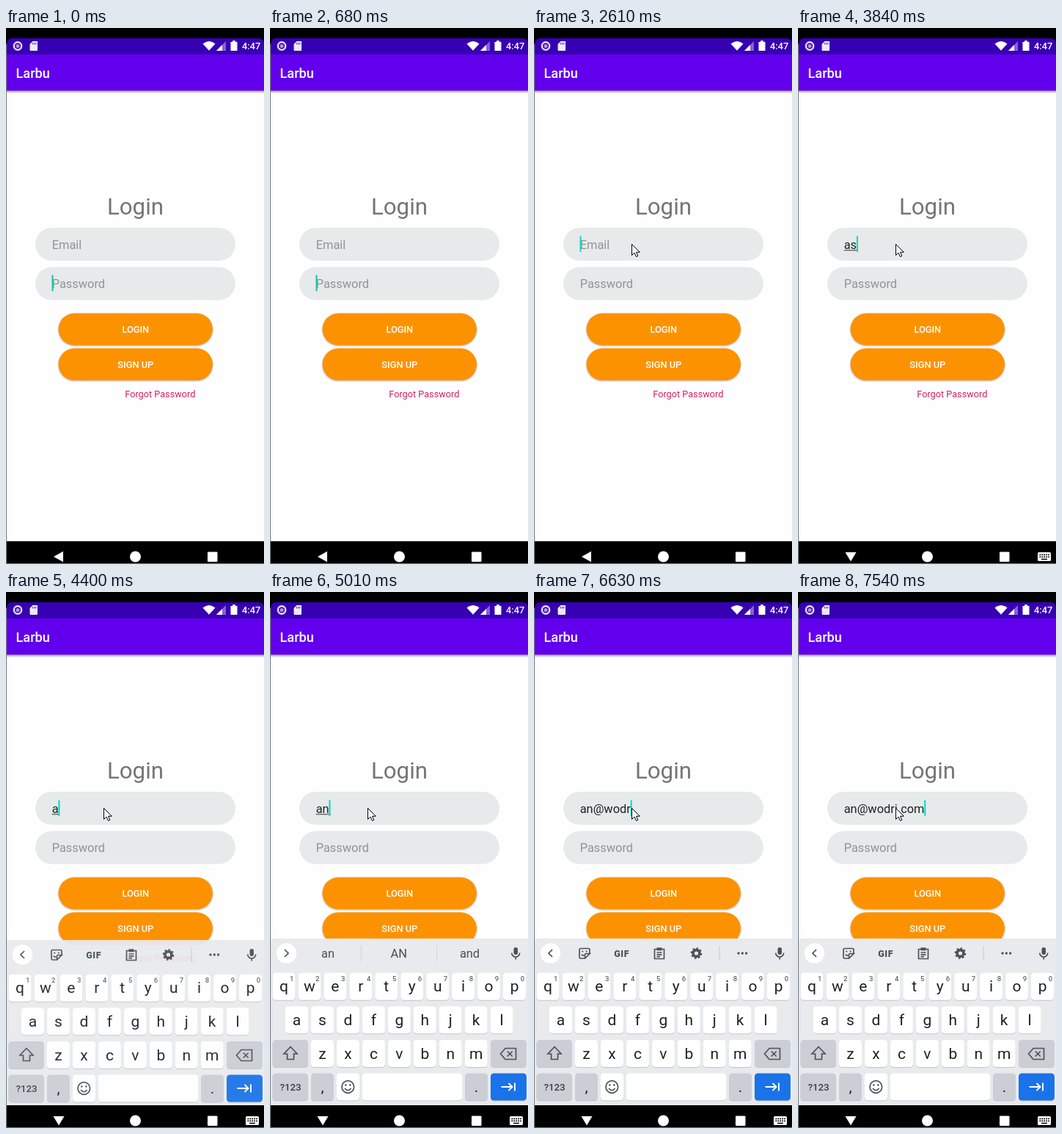
These frames come from a looping animation (352x730 px, 8000 ms). An HTML page:

```html
<!DOCTYPE html>
<html lang="en">
<head>
<meta charset="utf-8">
<title>Login screen</title>
<style>
  html, body { margin: 0; width: 100%; height: 100%; overflow: hidden; background: #fff; }
  svg { display: block; width: 352px; height: 730px; font-family: Roboto, sans-serif; }
  .medium { font-weight: 500; }
  .mid { text-anchor: middle; }
  .field { fill: #e6eaeb; }
  .entry { font-size: 16.4px; }
  .hint { fill: #8f9394; }
  .btn rect { fill: #fd9200; filter: drop-shadow(0 1.5px 1px rgba(0, 0, 0, .32)); }
  .btn text { fill: #fff; font-size: 12.8px; }
  .line { fill: none; stroke: #4d5156; stroke-width: 1.7; }
  .key { fill: #fff; }
  .fn { fill: #ccced5; }
  .go { fill: #1a73e8; }
  .edge { fill: #c3c6cb; }
  .letter { font-size: 21px; fill: #202124; }
  .digit { font-size: 9.5px; fill: #5f6368; font-weight: 500; }
  .word { font-size: 16.4px; fill: #4a4e53; }
</style>
</head>
<body>
<svg viewBox="0 0 352 730">
  <defs>
    <linearGradient id="shade" x2="0" y2="1">
      <stop stop-color="#000" stop-opacity=".34"/>
      <stop offset="1" stop-color="#000" stop-opacity="0"/>
    </linearGradient>
  </defs>

  <rect width="352" height="730" fill="#fefefe"/>
  <rect width="352" height="36" fill="#000"/>
  <path d="M1 36V22Q1 14 9 14H344Q352 14 352 22V36Z" fill="#3700b3"/>
  <rect x="1" y="36" width="351" height="49.5" fill="#6200ee"/>
  <rect x="1" y="85.5" width="351" height="4" fill="url(#shade)"/>

  <!-- status bar -->
  <circle cx="16" cy="24.5" r="5.2" fill="none" stroke="#e4dcf6" stroke-width="2.4"/>
  <circle cx="16" cy="24.5" r="2.6" fill="#a794de"/>
  <path d="M36.5 18H42Q43 18 43 19V30Q43 31 42 31H33.500Q32.500 31 32.500 30V22Z" fill="#eee9f8"/>
  <path d="M36.700 20v2.500M38.800 20v2.500M40.900 20v2.500" stroke="#3700b3" stroke-width=".9"/>
  <path d="M268.500 21.500Q277 14.500 285.500 21.500L277 30.800Z" fill="#fff"/>
  <path d="M300 18V31H287Z" fill="#8266d0"/>
  <path d="M295 23V31H287Z" fill="#fff"/>
  <path d="M306.500 19H309V17.300H313V19H315.500V31H306.500Z" fill="#fff"/>
  <text x="322" y="29.300" font-size="12.800" fill="#fff" class="medium">4:47</text>
  <text x="13.500" y="67.800" font-size="18.200" fill="#fff" class="medium">Larbu</text>

  <!-- form -->
  <text x="176.500" y="254.300" font-size="31.300" fill="#757575" class="mid">Login</text>
  <rect class="field" x="40" y="272" width="273" height="45" rx="22.500"/>
  <rect class="field" x="40" y="325.500" width="273" height="45" rx="22.500"/>
  <rect id="passCaret" x="62.500" y="336.500" width="2" height="22" fill="#14bfa9"/>
  <text class="entry hint" x="62.700" y="354">Password</text>
  <rect id="caret" x="62.500" y="283.500" width="2" height="21.500" fill="#03dac5"/>
  <text class="entry hint" id="hint" x="62.700" y="300.700">Email</text>
  <text class="entry" id="typed" x="62.700" y="300.700" fill="#212121"></text>
  <rect id="underline" x="62.700" y="302.300" height="1" fill="#333"/>
  <g class="btn">
    <rect x="71.500" y="388.500" width="210.500" height="43.500" rx="21.700"/>
    <text x="176.800" y="415.200" class="mid medium">LOGIN</text>
    <rect x="71.500" y="436.300" width="210.500" height="43.500" rx="21.700"/>
    <text x="176.800" y="463" class="mid medium">SIGN UP</text>
  </g>
  <text x="162.300" y="502.800" font-size="12.700" fill="#d81b60">Forgot Password</text>

  <!-- keyboard -->
  <g id="board">
    <rect x="1" y="472" width="351" height="228" fill="#e8eaed"/>
    <circle cx="22.500" cy="492" r="13.700" fill="#fff"/>
    <path id="chevron" class="line"/>
    <g fill="#4d5156">
      <rect x="332.500" y="484" width="5.500" height="10" rx="2.750"/>
      <path class="line" d="M329.700 491.500a5.500 5.500 0 0 0 11 0M335.200 497v3.500"/>
    </g>
    <g id="tools" fill="#4d5156">
      <path class="line" d="M76 492.500V487Q76 485.500 74.500 485.500H63.500Q62 485.500 62 487V497.500Q62 499 63.500 499H69.500L76 492.500H71Q69.500 492.500 69.500 494V499"/>
      <circle cx="66.300" cy="489.500" r="1.100"/><circle cx="71.700" cy="489.500" r="1.100"/>
      <path class="line" d="M64.800 493.500q1.500 2 3.700 1.500"/>
      <text x="119.700" y="496.500" class="mid" font-size="12.500" font-weight="900" letter-spacing=".6">GIF</text>
      <path class="line" d="M164.500 486.500H177.500V499.500H164.500ZM167.500 491h7M167.500 493.800h7M167.500 496.600h4.500"/>
      <rect x="167.500" y="484.300" width="7" height="4"/>
      <circle class="line" cx="221.500" cy="492" r="4.400" style="stroke-width:3.600"/>
      <circle class="line" cx="221.500" cy="492" r="6.700" pathLength="16" stroke-dasharray="1" style="stroke-width:2.200"/>
      <rect x="252.500" y="482" width="1" height="20" fill="#c6c9cd"/>
      <circle cx="279" cy="492" r="1.700"/><circle cx="284.300" cy="492" r="1.700"/><circle cx="289.600" cy="492" r="1.700"/>
    </g>
    <g id="words" class="word mid">
      <text x="79" y="498">an</text>
      <text x="175.700" y="498">AN</text>
      <text x="272.500" y="498">and</text>
      <path d="M124.500 481v22M227.500 481v22" stroke="#d0d3d7"/>
    </g>
    <g id="keys"></g>
    <path class="line" d="M28 619.500L37 629H32.500V636.500H23.500V629H19Z"/>
    <path class="line" d="M321 621.500H335.500V636.500H321L314.500 629ZM323.700 625.500l7 7M330.700 625.500l-7 7"/>
    <circle class="line" cx="106.300" cy="674" r="8.300"/>
    <path class="line" d="M102 676q4.300 5.500 8.600 0"/>
    <circle cx="103.300" cy="671.500" r="1.300" fill="#4d5156"/><circle cx="109.300" cy="671.500" r="1.300" fill="#4d5156"/>
    <path d="M315.500 674H330M325.500 669l5 5l-5 5M334 668.500v11" fill="none" stroke="#fff" stroke-width="1.900"/>
    <text x="28" y="679" class="mid medium" font-size="13.300" fill="#3c4043">?123</text>
  </g>

  <!-- navigation bar -->
  <rect y="699" width="352" height="31" fill="#000"/>
  <path id="back" fill="#fff"/>
  <circle cx="176.500" cy="720" r="7.500" fill="#fff"/>
  <rect x="275" y="713.500" width="13.500" height="13.500" rx="1" fill="#fff"/>
  <g id="switcher">
    <rect x="327" y="714" width="18" height="12" rx="1.500" fill="#fff"/>
    <path d="M329.500 717.300h13.500M329.500 720.300h13.500" stroke="#000" stroke-width="1.700" stroke-dasharray="1.700 1.200"/>
    <path d="M332 723.500h8" stroke="#000" stroke-width="1.500"/>
  </g>
  <path d="M.5 22V729.500H352" fill="none" stroke="#777"/>

  <path id="pointer" d="M.5 .5V15.500L4 12.200L6.500 17.500L8.800 16.500L6.500 11.300H11.300Z" fill="#fff" stroke="#000"/>
</svg>

<script>
  const LOOP = 8000;
  const el = id => document.getElementById(id);
  const at = (list, t) => list.filter(s => s[0] <= t).pop();
  const within = (spans, t) => spans.some(([a, b]) => t >= a && t < b);
  const show = (id, on) => el(id).setAttribute('visibility', on ? 'visible' : 'hidden');

  function key(x, y, w, label, cls = 'key', digit) {
    const box = (c, dy) => `<rect class="${c}" x="${x}" y="${y + dy}" width="${w}" height="37" rx="4.5"/>`;
    return box('edge', 1) + box(cls, 0)
      + (label ? `<text class="letter mid" x="${x + w / 2}" y="${y + 25.7}">${label}</text>` : '')
      + (digit ? `<text class="digit mid" x="${x + 26.3}" y="${y + 11.7}">${digit}</text>` : '');
  }

  const row = (chars, x, y, digits = '') =>
    [...chars].map((c, i) => key(x + i * 34.95, y, 31, c, 'key', digits[i])).join('');

  el('keys').innerHTML =
    row('qwertyuiop', 3.5, 518.7, '1234567890') +
    row('asdfghjkl', 21, 564.3) +
    key(3.5, 610, 48.5, '', 'fn') + row('zxcvbnm', 56, 610) + key(301, 610, 49, '', 'fn') +
    key(3.5, 655.5, 48.5, '', 'fn') + key(56, 655.5, 31, ',', 'fn') + key(91, 655.5, 31) +
    key(125.5, 655.5, 136.5) + key(266, 655.5, 31, '.', 'fn') + key(301, 655.5, 49, '', 'go');

  // time, text, underlined characters
  const address = 'an@wodri.com';
  const typing = [
    [0, '', 0], [3720, 'a', 1], [3840, 'as', 2], [4400, 'a', 1], [4700, 'an', 1], [5010, 'an', 2],
    ...[5970, 6240, 6360, 6480, 6630, 7030, 7150, 7270, 7420, 7540]
      .map((t, i) => [t, address.slice(0, i + 3), 0])
  ];
  const strip = [[0, 'tools'], [4550, ''], [5010, 'words'], [6090, 'tools']];
  const mouse = [
    [0, -40, 0], [1520, 179, 593], [1830, 184, 398], [1950, 172, 367], [2070, 157, 337],
    [2190, 149, 320], [2340, 140, 305], [2460, 133, 294]
  ];
  const passOn = [[0, 250], [680, 1240], [1830, 2190]];
  const emailOn = [[2610, 3170], [3570, 5410], [5970, LOOP]];

  function draw(t) {
    const [, text, marked] = at(typing, t);
    const typed = el('typed');
    if (typed.textContent !== text) typed.textContent = text;
    const width = text ? typed.getComputedTextLength() : 0;
    el('caret').setAttribute('x', 62.5 + width);
    el('underline').setAttribute('width', marked ? typed.getSubStringLength(0, marked) : 0);
    show('hint', !text);
    show('caret', within(emailOn, t));
    show('passCaret', within(passOn, t));

    const opening = t < 4550;
    const panel = at(strip, t)[1];
    const up = t >= 4400;
    el('board').setAttribute('transform', `translate(0 ${opening ? 2 : 0})`);
    el('board').setAttribute('opacity', opening ? .94 : 1);
    el('board').setAttribute('display', up ? 'inline' : 'none');
    show('tools', panel === 'tools');
    show('words', panel === 'words');
    el('chevron').setAttribute('d', panel === 'tools' ? 'M25 487l-5 5l5 5' : 'M20 487l5 5l-5 5');

    const docked = t >= 3290;
    el('back').setAttribute('d', docked ? 'M64.500 714H79.500L72 726.500Z' : 'M65 720L78 712.800V727.200Z');
    show('switcher', docked);

    const [, x, y] = at(mouse, t);
    el('pointer').setAttribute('transform', `translate(${x} ${y})`);
  }

  const start = performance.now();
  function tick() {
    draw((performance.now() - start) % LOOP);
    requestAnimationFrame(tick);
  }
  tick();
</script>
</body>
</html>
```
